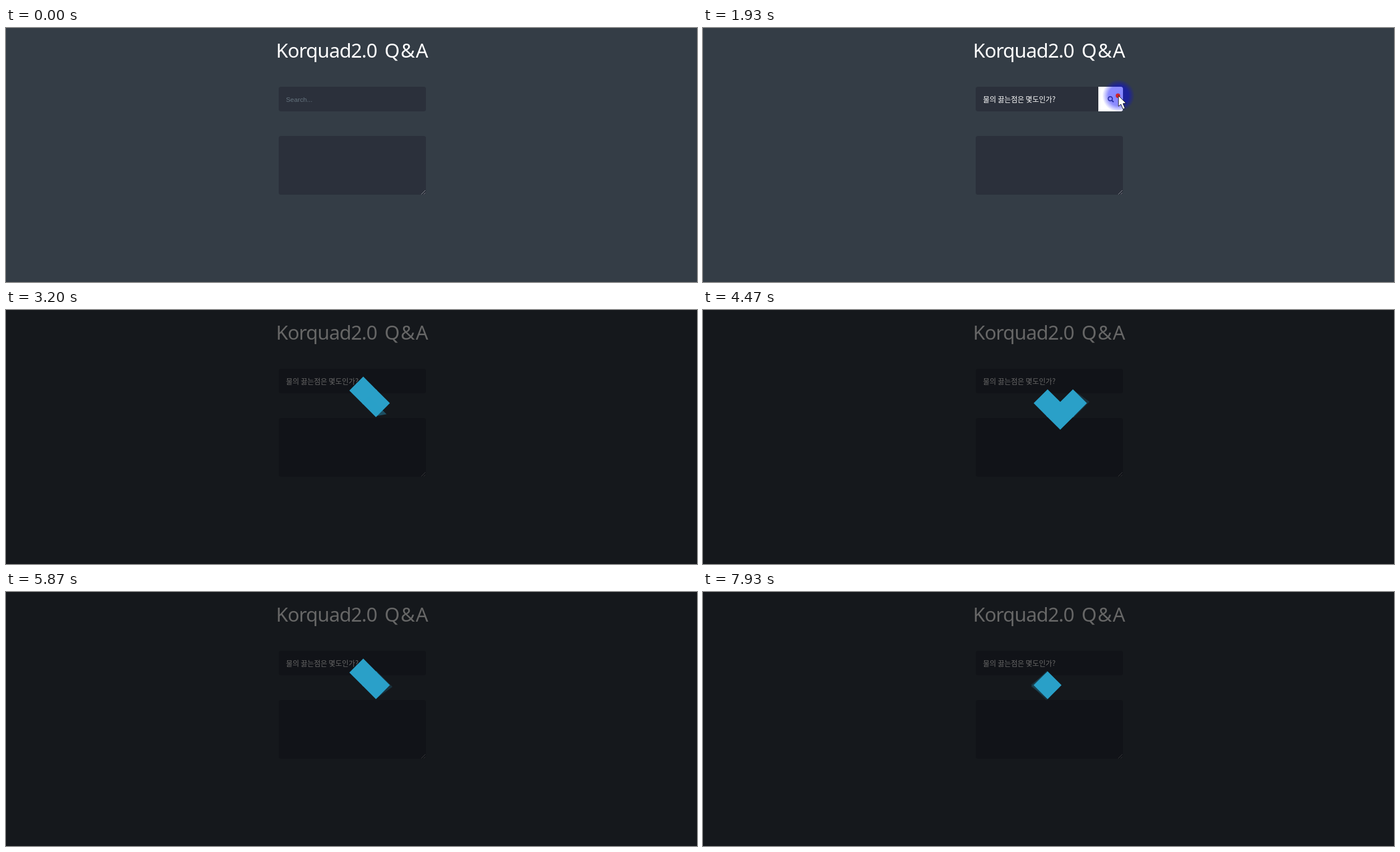
An HTML page with a canvas that plays this animation: 1234x454 px, repeating every 8 s.

```html
<!DOCTYPE html>
<html lang="ko">
<head>
<meta charset="utf-8">
<title>Korquad2.0 Q&amp;A</title>
<style>
  html, body { margin: 0; width: 100%; height: 100%; overflow: hidden; background: #343d46; }
  canvas { display: block; }
</style>
</head>
<body>
<canvas id="stage" width="1234" height="454"></canvas>
<script>
const ctx = document.getElementById('stage').getContext('2d');
const LOOP = 8000, FPS = 15;
const TAU = Math.PI * 2;

// Events, in steps of 1/15 s
const HOVER_FIELD = 7, FOCUS = 12, HOVER_BUTTON = 16, PASTE = 20, SUBMIT = 29, LEAVE = 31;
const HOVER_STEPS = 9.45;

// Pointer path: step, x, y
const POINTER = [
  [4, 1181, 184], [7, 745, 150], [9, 640, 136], [10, 619, 134], [13, 619, 134],
  [16, 738, 121], [18, 746, 121], [27, 746, 121], [29, 742, 121], [34, 742, 121], [36, 878, 126]
];
// Milliseconds on the page clock: stage time, spinner time
const SPIN = [[2070, 0], [3200, 984], [4470, 2095], [5870, 3312], [6870, 4212], [7930, 5092]];

const clamp = v => Math.max(0, Math.min(1, v));
const lerp = (a, b, p) => a + (b - a) * p;

function track(keys, t, col) {
  let n = 1;
  while (n < keys.length - 1 && t > keys[n][0]) n++;
  const a = keys[n - 1], b = keys[n];
  return lerp(a[col], b[col], (t - a[0]) / (b[0] - a[0]));
}

// CSS "ease" curve
function ease(p) {
  p = clamp(p);
  if (p === 0 || p === 1) return p;
  const curve = (u, a, b) => 3 * u * (1 - u) ** 2 * a + 3 * u * u * (1 - u) * b + u ** 3;
  let lo = 0, hi = 1;
  for (let n = 0; n < 24; n++) {
    const mid = (lo + hi) / 2;
    if (curve(mid, 0.25, 0.25) < p) lo = mid; else hi = mid;
  }
  return curve(lo, 0.1, 1);
}

function box(x, y, w, h, radii, fill) {
  ctx.fillStyle = fill;
  ctx.beginPath();
  ctx.roundRect(x, y, w, h, radii);
  ctx.fill();
}

function label(text, x, y, font, fill, spacing = 0) {
  ctx.font = font;
  ctx.fillStyle = fill;
  ctx.letterSpacing = spacing + 'px';
  ctx.fillText(text, x, y);
  ctx.letterSpacing = '0px';
}

function line(x1, y1, x2, y2, color, width = 1) {
  ctx.strokeStyle = color;
  ctx.lineWidth = width;
  ctx.beginPath();
  ctx.moveTo(x1, y1);
  ctx.lineTo(x2, y2);
  ctx.stroke();
}

function circle(x, y, r) {
  ctx.beginPath();
  ctx.arc(x, y, r, 0, TAU);
}

function polygon(points) {
  ctx.beginPath();
  points.forEach(([x, y]) => ctx.lineTo(x, y));
  ctx.closePath();
}

function drawField(step) {
  const focused = step >= FOCUS && step < SUBMIT;
  const filled = step >= PASTE;
  box(487, 105, 263, 44, focused ? 0 : 4, '#2b303b');
  if (focused) {
    ctx.strokeStyle = '#4560a8';
    ctx.lineWidth = 1;
    ctx.strokeRect(487.5, 105.5, 262, 43);
  }
  if (filled) {
    label('물의 끓는점은 몇도인가?', 500, 132, '12.8px "Noto Sans CJK KR", "Noto Sans CJK", sans-serif', '#fff');
  } else {
    label('Search...', 500, 131.5, '11.8px "Liberation Sans", sans-serif', '#65737e');
  }
  if (focused) {
    ctx.fillStyle = '#fff';
    ctx.fillRect(filled ? 631 : 501, 121, 1, 13);
  }
}

function drawButton(step) {
  const out = 1 - ease((step - LEAVE) / HOVER_STEPS);
  const shown = ease((step - HOVER_FIELD) / HOVER_STEPS) * out;
  const white = ease((step - HOVER_BUTTON) / HOVER_STEPS) * out;
  if (shown <= 0) return;
  const x = 750 - 44 * shown;
  const shade = [35, 40, 51].map(c => Math.round(lerp(c, 255, white)));
  ctx.globalAlpha = shown;
  box(x, 105, 44, 44, [0, 4, 4, 0], `rgb(${shade})`);
  ctx.strokeStyle = '#4f5b66';
  ctx.lineWidth = 1.9;
  circle(x + 21.3, 126.4, 3.7);
  ctx.stroke();
  line(x + 24, 129.2, x + 27.2, 132.4, '#4f5b66', 2.2);
  ctx.globalAlpha = 1;
}

function drawPage(step) {
  ctx.fillStyle = '#343d46';
  ctx.fillRect(0, 0, 1234, 454);
  const font = '34.8px "Noto Sans", "Open Sans", sans-serif';
  label('Korquad2.0', 482.3, 53, font, '#fff', -0.9);
  label('Q&A', 676, 53, font, '#fff', 1.5);
  drawField(step);
  drawButton(step);
  box(487, 193, 263, 105, 4, '#2b303b');
  line(741.5, 297.5, 749, 290, '#8c8f95');
  line(746, 297.5, 749, 294.5, '#8c8f95');
}

// One square of the folding spinner, projected from its hinge corner
function drawFold(index, time) {
  const phase = time - 300 * index;
  if (phase < 0) return;
  const p = (phase % 2400) / 2400;
  const enter = clamp((p - 0.1) / 0.15), exit = clamp((p - 0.75) / 0.15);
  const alpha = enter * (1 - exit);
  if (alpha <= 0) return;
  const tilt = -Math.PI * (1 - enter), turn = Math.PI * exit;
  const corners = [[-32, -32], [0, -32], [0, 0], [-32, 0]].map(([x, y]) => {
    const z = y * Math.sin(tilt) - x * Math.sin(turn);
    const k = 140 / (140 - z);
    return [16 + x * Math.cos(turn) * k, 16 + y * Math.cos(tilt) * k];
  });
  ctx.save();
  ctx.globalAlpha *= alpha;
  ctx.translate(638, 166.6);
  ctx.rotate(Math.PI / 4 + index * Math.PI / 2);
  ctx.translate(-16, -16);
  ctx.scale(1.1, 1.1);
  polygon(corners);
  ctx.fillStyle = '#2aa0c8';
  ctx.fill();
  ctx.restore();
}

function drawOverlay(t) {
  const p = clamp((t - 2075) / 685);
  if (p === 0) return;
  const time = track(SPIN, t, 1);
  ctx.globalAlpha = 0.5 - Math.cos(p * Math.PI) / 2;
  ctx.fillStyle = 'rgba(0, 0, 0, 0.6)';
  ctx.fillRect(0, 0, 1234, 454);
  [0, 1, 3, 2].forEach(n => drawFold(n, time));
  ctx.globalAlpha = 1;
}

function drawRipple(age, x, y) {
  if (age < 0 || age > 8) return;
  const r = 4 + 3.3 * age;
  ctx.globalAlpha = 1 - 0.07 * age;
  if (age < 1) {
    ctx.fillStyle = '#d0242c';
    circle(x, y, r);
    ctx.fill();
  } else {
    ctx.strokeStyle = 'rgba(130, 20, 40, 0.6)';
    ctx.lineWidth = 3;
    circle(x, y, r - 1.8);
    ctx.stroke();
    ctx.strokeStyle = '#c8202c';
    ctx.lineWidth = 1.2;
    for (const inset of [0.3, 3.3]) {
      circle(x, y, r - inset);
      ctx.stroke();
    }
  }
  ctx.globalAlpha = 1;
}

function drawPointer(step) {
  const visible = step >= POINTER[0][0] && step <= POINTER[POINTER.length - 1][0];
  const x = track(POINTER, step, 1), y = track(POINTER, step, 2);
  if (visible) {
    const halo = ctx.createRadialGradient(x, y, 0, x, y, 29);
    halo.addColorStop(0, 'rgba(0, 0, 255, 0.48)');
    halo.addColorStop(0.62, 'rgba(0, 0, 255, 0.45)');
    halo.addColorStop(0.85, 'rgba(0, 0, 255, 0.18)');
    halo.addColorStop(1, 'rgba(0, 0, 255, 0)');
    ctx.fillStyle = halo;
    circle(x, y, 29);
    ctx.fill();
  }
  drawRipple(step - FOCUS, 619, 134);
  drawRipple(step - SUBMIT, 741, 121);
  if (!visible) return;
  ctx.save();
  ctx.translate(x, y);
  polygon([[0, 0], [0, 19], [4.3, 15.2], [8, 24], [11.6, 22.4], [8, 14], [13.5, 13.6]]);
  ctx.fillStyle = '#fff';
  ctx.fill();
  ctx.strokeStyle = '#14161c';
  ctx.lineWidth = 1;
  ctx.stroke();
  ctx.restore();
}

function render(now) {
  const step = Math.floor((now % LOOP + 5) * FPS / 1000);
  const t = step * 1000 / FPS;
  drawPage(step);
  drawOverlay(t);
  drawPointer(step);
}

const start = performance.now();
function tick() {
  render(performance.now() - start);
  requestAnimationFrame(tick);
}
tick();
</script>
</body>
</html>
```
